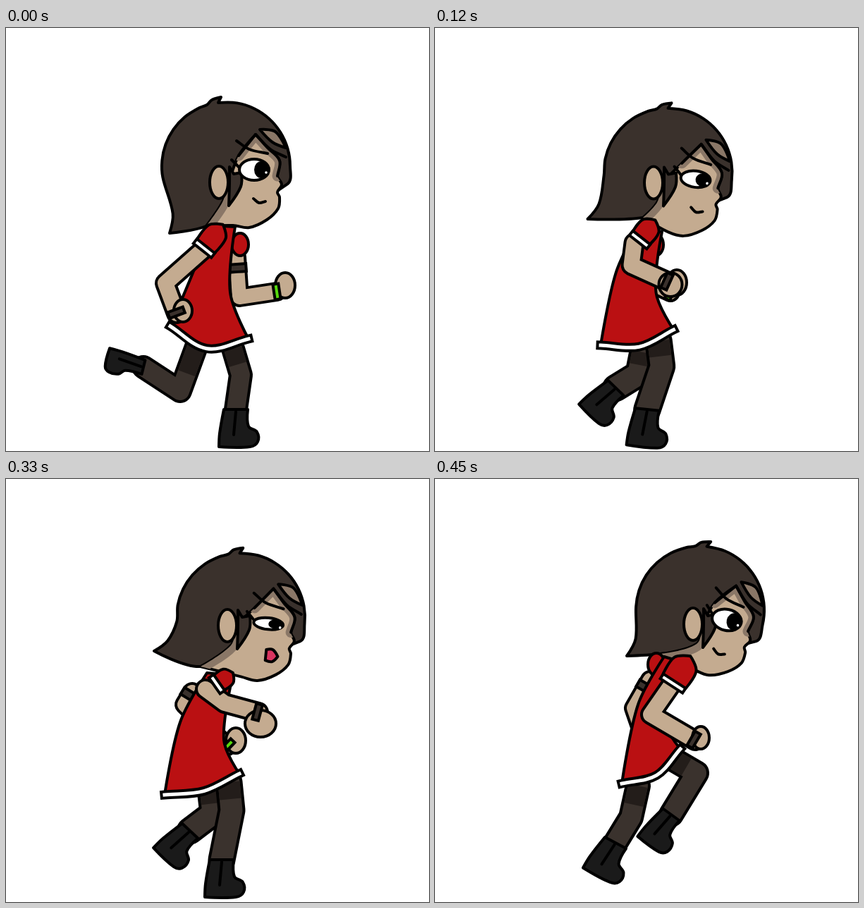
Recreate the animation shown at these times as an HTML page with a canvas. Size 600x600 px, loop 0.51 s.

```html
<!DOCTYPE html>
<html lang="en">
<head>
<meta charset="utf-8">
<title>Running girl</title>
<style>
html, body { margin: 0; width: 100%; height: 100%; overflow: hidden; background: #fff; }
canvas { display: block; width: 600px; height: 600px; }
</style>
</head>
<body>
<canvas id="stage" width="600" height="600"></canvas>
<script>
const ctx = document.getElementById("stage").getContext("2d");
ctx.lineJoin = "round";

const HAIR = "#3a312c", SKIN = "#c4ab90", SHADE = "#8a7767", RED = "#ba1012", TIGHTS = "#3a322d",
  DARK = "#231d1a", BOOT = "#1a1a1a", WHITE = "#fff", GREEN = "#58d80e", PINK = "#d8345f";
const LINE = 4;

// Joints of each pose. Limbs run from the body outwards; legs are [lifted, standing].
const stride = {
  head: [312, 196], tilt: 0, turn: 0, open: 1, mouth: [47, 48, 0],
  tip: [232, 291], nape: [284, 281], ear: [302, 219],
  dress: [[290, 280], [270, 335], [233, 423], [344, 441], [318, 375], [325, 282]], bulge: 23,
  nearArm: [[278, 316], [226, 362], [242, 405]], nearHand: [251, 401, 13, 16],
  farArm: [[327, 325], [331, 382], [384, 374]], farHand: [396, 365], farSleeve: [332, 307],
  cuff: [[269, 303], [293, 322]], sleeve: 43, legWidth: 30,
  legs: [[[270, 452], [247, 515], [195, 481]], [[322, 455], [333, 492], [326, 541]]],
  boots: [[104, 0.6], [0, 1]]
};
const crouch = {
  head: [328, 213], tilt: 8, turn: 0, open: 1, mouth: [44, 45, 0],
  tip: [223, 298], nape: [314, 272], ear: [306, 231],
  dress: [[290, 290], [266, 350], [245, 452], [346, 438], [318, 380], [322, 300]], bulge: 17,
  nearArm: [[282, 312], [247, 355], [303, 389]], nearHand: [307, 381, 11, 15],
  farArm: [[305, 330], [305, 378], [354, 371]], farHand: [360, 351], farSleeve: [324, 315],
  cuff: [[266, 302], [298, 318]], sleeve: 43, legWidth: 36,
  legs: [[[300, 480], [284, 507], [252, 522]], [[318, 458], [323, 490], [296, 542]]],
  boots: [[45, 0.9], [12, 1]]
};
const swing = {
  head: [333, 196], tilt: 6, turn: 0, open: 0.55, mouth: [49, 50, 9],
  tip: [210, 244], nape: [276, 266], ear: [314, 208],
  dress: [[285, 275], [247, 345], [225, 448], [331, 418], [309, 370], [322, 278]], bulge: 10,
  nearArm: [[283, 298], [310, 318], [358, 331]], nearHand: [361, 347, 22, 19],
  farArm: [[264, 302], [253, 320], [314, 379]], farHand: [326, 371], farSleeve: [300, 300],
  cuff: [[292, 281], [306, 301]], sleeve: 28, legWidth: 35,
  legs: [[[290, 440], [294, 474], [261, 499]], [[316, 430], [320, 470], [306, 540]]],
  boots: [[43, 0.9], [0, 1]]
};
const lunge = {
  head: [365, 190], tilt: 14, turn: 45, open: 0, mouth: [26, 57, 13],
  tip: [258, 268], nape: [302, 257], ear: [306, 203],
  dress: [[300, 265], [230, 355], [216, 436], [316, 433], [296, 375], [340, 288]], bulge: 8,
  nearArm: [[336, 300], [395, 323], [452, 334]], nearHand: [454, 350, 26, 23],
  farArm: [[275, 287], [257, 303], [305, 362]], farHand: [314, 373], farSleeve: [300, 300],
  cuff: [[330, 314], [338, 292]], sleeve: 18, legWidth: 41,
  legs: [[[238, 440], [218, 498], [196, 455]], [[278, 445], [283, 490], [289, 538]]],
  boots: [[160, 1], [-18, 1]]
};
const leap = {
  head: [376, 186], tilt: 13, turn: 0, open: 1, mouth: [39, 51, 0],
  tip: [272, 251], nape: [320, 248], ear: [366, 206],
  dress: [[325, 252], [288, 320], [265, 432], [348, 383], [318, 325], [345, 258]], bulge: 15,
  nearArm: [[338, 288], [306, 334], [369, 371]], nearHand: [377, 367, 12, 16],
  farArm: [[305, 285], [282, 325], [294, 360]], farHand: [302, 365], farSleeve: [314, 263],
  cuff: [[322, 280], [353, 300]], sleeve: 46, legWidth: 32,
  legs: [[[335, 396], [371, 417], [335, 476]], [[288, 435], [278, 480], [256, 516]]],
  boots: [[36, 0.85], [28, 1]]
};

function mix(a, b, t) {
  if (typeof a === "number") return a + (b - a) * t;
  if (Array.isArray(a)) return a.map((value, i) => mix(value, b[i], t));
  return Object.fromEntries(Object.keys(a).map(key => [key, mix(a[key], b[key], t)]));
}
const add = ([x, y], dx, dy) => [x + dx, y + dy];
function normal([ax, ay], [bx, by]) {
  const length = Math.hypot(bx - ax, by - ay);
  return [(by - ay) / length, (ax - bx) / length];
}

// Smooth curve through points; sharp turns stay corners.
function trace(pts, closed) {
  const n = pts.length;
  const at = i => closed ? pts[(i + n) % n] : pts[Math.max(0, Math.min(n - 1, i))];
  const direction = i => {
    const [a, b, c] = [at(i - 1), at(i), at(i + 1)];
    const ux = b[0] - a[0], uy = b[1] - a[1], vx = c[0] - b[0], vy = c[1] - b[1];
    if (ux * vx + uy * vy < 0.42 * Math.hypot(ux, uy) * Math.hypot(vx, vy)) return [0, 0];
    const length = Math.hypot(ux + vx, uy + vy) || 1;
    return [(ux + vx) / length, (uy + vy) / length];
  };
  ctx.beginPath();
  ctx.moveTo(...pts[0]);
  for (let i = 0; i < (closed ? n : n - 1); i++) {
    const p = at(i), q = at(i + 1), d = direction(i), e = direction(i + 1);
    const reach = Math.hypot(q[0] - p[0], q[1] - p[1]) / 3;
    ctx.bezierCurveTo(p[0] + d[0] * reach, p[1] + d[1] * reach,
      q[0] - e[0] * reach, q[1] - e[1] * reach, ...q);
  }
  if (closed) ctx.closePath();
}
function ink(width = LINE, color = "#000", cap = "round") {
  ctx.lineWidth = width;
  ctx.strokeStyle = color;
  ctx.lineCap = cap;
  ctx.stroke();
}
function fill(color) {
  ctx.fillStyle = color;
  ctx.fill();
}
function part(color, pts) {
  trace(pts, true);
  fill(color);
  ink();
}
function line(...pts) {
  trace(pts);
  ink();
}
function oval(color, x, y, rx, ry, outlined = true) {
  ctx.beginPath();
  ctx.ellipse(x, y, rx, ry, 0, 0, Math.PI * 2);
  fill(color);
  if (outlined) ink();
}
function outline(color, width, cap) {
  ink(width + LINE, "#000", cap);
  ink(width - LINE, color, cap);
}
function limb(color, joints, width) {
  ctx.beginPath();
  joints.forEach(joint => ctx.lineTo(...joint));
  outline(color, width, "round");
}
function strip(color, pts, width) {
  trace(pts);
  outline(color, width, "square");
}
// A band across a limb, t of the way from one joint to the next.
function band(color, from, to, t, reach, width) {
  const [x, y] = mix(from, to, t), [nx, ny] = normal(from, to);
  strip(color, [[x - nx * reach, y - ny * reach], [x + nx * reach, y + ny * reach]], width);
}

function drawHead({ head, tilt, turn, open, mouth, tip, nape, ear }) {
  const angle = tilt * Math.PI / 180, cos = Math.cos(angle), sin = Math.sin(angle);
  const onHead = ([x, y]) => add(head, x * cos - y * sin, x * sin + y * cos);
  const arc = (from, to, step) => {
    const pts = [];
    for (let a = from; a <= to; a += step) {
      pts.push([91 * Math.cos(a * Math.PI / 180), 91 * Math.sin(a * Math.PI / 180)]);
    }
    return pts;
  };
  const crown = [...arc(170, 245, 15), [-27, -87], [-20, -94], [-7, -98], [-11, -90], ...arc(280, 376, 16)].map(onHead);
  part(HAIR, [tip, add(mix(tip, crown[0], 0.35), 8, 0), ...crown, nape]);

  const peak = [42 - turn, -45], brow = [59 - turn / 2, -26], temple = [76, -8];
  const hairline = [[18 - turn * 0.8, -15], peak, brow, temple, [73, 14]].map(onHead);
  const jaw = [[79, 26], [73, 37], [76, 44], [74, 60], [58, 76], [33, 87], [10, 84]].map(onHead);
  const neck = [nape, add(ear, 5, 28), add(ear, 14, 0)];
  ctx.save();
  trace([...hairline, ...jaw, ...neck], true);
  fill(SKIN);
  ink();
  ctx.clip();
  trace(hairline);
  ink(15, SHADE);
  trace(neck);
  ink(20, SHADE);
  ctx.restore();
  trace(hairline);
  ink();

  part(HAIR, [[15, -22], [21, -12], [32, -14], [31, 6], [14, 33], [15, 2]].map(([x, y]) => add(ear, x, y)));
  oval(SKIN, ...ear, 13, 23);

  ctx.save();
  ctx.translate(...head);
  ctx.rotate(angle);
  part(SHADE, [[48 - turn, -52], [70 - turn / 2, -49], [85, -26], [66 - turn / 2, -34]]);
  line(peak, add(brow, 4, 2), [85, -13]);
  const eyeX = 40 - turn * 0.9;
  line([eyeX - 25, -36], [eyeX - 7, -24], [eyeX + 19, -18]);
  line([eyeX - 32, -9], [eyeX - 21, 2]);
  if (open > 0.1) {
    oval(WHITE, eyeX, 5, 21, 15 * open);
    oval("#000", eyeX + 10, 5, 10, 12 * open, false);
    oval(WHITE, eyeX + 17, 9, 1.8, 1.8, false);
  } else {
    line([eyeX - 21, 10], [eyeX, 14], [eyeX + 21, 8]);
    line([40, 5], [54, 9], [68, 7]);
    line([32, 11], [40, 19], [35, 29]);
  }
  const [mouthX, mouthY, size] = mouth;
  if (size > 5) {
    part(PINK, [[-0.9, -0.9], [0.1, -1], [1, 0], [0.2, 0.9], [-0.9, 0.8]]
      .map(([x, y]) => [mouthX + x * size, mouthY + y * size]));
  } else {
    line([mouthX - 8, mouthY - 2], [mouthX, mouthY + 4], [mouthX + 9, mouthY + 2]);
  }
  ctx.restore();
}

function drawFarArm({ farArm, farHand, farSleeve }) {
  const [shoulder, elbow, wrist] = farArm;
  limb(SKIN, farArm, 24);
  band(HAIR, shoulder, elbow, 0.27, 7, 11);
  oval(RED, ...farSleeve, 12, 16);
  oval(SKIN, ...farHand, 14, 18);
  band(GREEN, elbow, wrist, 1, 7, 8);
}

function drawLeg([hip, knee, ankle], width, [angle, breadth]) {
  limb(TIGHTS, [hip, knee, ankle], width);
  ctx.beginPath();
  ctx.moveTo(...hip);
  ctx.lineTo(...mix(hip, knee, 0.6));
  ink(width - LINE, DARK, "butt");
  ctx.save();
  ctx.translate(...ankle);
  ctx.rotate(angle * Math.PI / 180);
  part(BOOT, [[-17, 0], [17, 0], [18, 24], [30, 32], [31, 46], [20, 53], [-24, 53], [-23, 34]]
    .map(([x, y]) => [x * breadth, y]));
  line([0, 3], [-3, 36]);
  ctx.restore();
}

function drawDress({ dress, bulge }) {
  const [shoulder, back, hemBack, hemFront, front, collar] = dress;
  const [nx, ny] = normal(hemBack, hemFront);
  const hemMiddle = add(mix(hemBack, hemFront, 0.5), -nx * bulge, -ny * bulge);
  part(RED, [shoulder, back, hemBack, hemMiddle, hemFront, front, collar]);
  strip(WHITE, [hemBack, hemMiddle, hemFront], 9);
}

function drawNearArm({ nearArm, nearHand, cuff, sleeve }) {
  const [, elbow, wrist] = nearArm, [a, b] = cuff;
  limb(SKIN, nearArm, 26);
  oval(SKIN, ...nearHand);
  band(HAIR, elbow, wrist, 0.97, 7, 9);
  const [nx, ny] = normal(a, b);
  const raise = (p, share) => add(p, nx * sleeve * share, ny * sleeve * share);
  part(RED, [a, raise(a, 0.7), raise(mix(a, b, 0.5), 1), raise(b, 0.7), b]);
  strip(WHITE, [mix(a, b, 0.1), mix(a, b, 0.9)], 8);
}

function draw(pose) {
  drawHead(pose);
  drawFarArm(pose);
  pose.legs.forEach((leg, i) => drawLeg(leg, pose.legWidth, pose.boots[i]));
  drawDress(pose);
  drawNearArm(pose);
}

// Each pose holds until its end time in the loop.
const steps = [
  [60, stride], [120, crouch], [180, mix(crouch, swing, 0.5)], [240, swing],
  [330, lunge], [390, swing], [450, mix(swing, leap, 0.5)], [510, leap]
];
const start = performance.now();

function frame() {
  const time = Math.max(0, performance.now() - start) % 510;
  ctx.fillStyle = WHITE;
  ctx.fillRect(0, 0, 600, 600);
  draw(steps.find(([end]) => time < end)[1]);
  requestAnimationFrame(frame);
}
frame();
</script>
</body>
</html>
```
